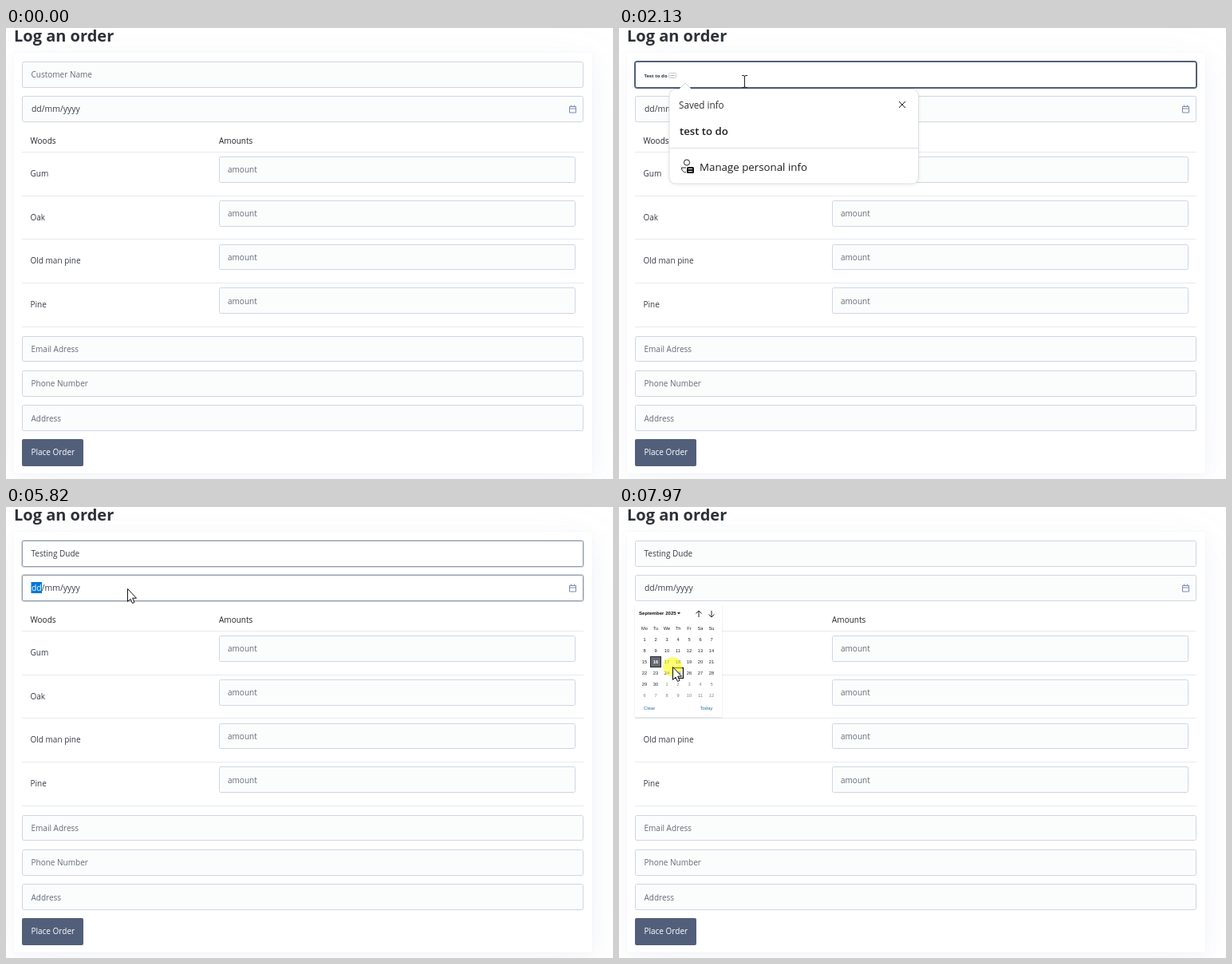
An HTML page that plays this animation: 761 by 565 pixels, repeating every 8 s.

```html
<!DOCTYPE html>
<html lang="en">
<head>
<meta charset="utf-8">
<title>Log an order</title>
<style>
  html, body { margin: 0; width: 100%; height: 100%; overflow: hidden; background: #fff; }
  body { position: relative; }
  .card {
    position: absolute; left: 10px; top: 31px; width: 725px; height: 527px;
    border-radius: 3px; background: #fff;
    box-shadow: 5px 11px 64px rgba(129,145,181,.06), 2px 4px 16px rgba(129,145,181,.06),
      0 0 0 1px rgba(129,145,181,.025);
  }
  svg { position: absolute; left: 0; top: 0; width: 761px; height: 565px; }
  text { font: 10px "Open Sans", "Noto Sans", sans-serif; fill: #373c44; white-space: pre; }
  .title { font-size: 20px; font-weight: 700; fill: #2d3138; }
  .hint { fill: #646b79; }
  .head { font-weight: 500; fill: #23262c; }
  .date { font-size: 10.4px; }
  .saved { font-size: 11.7px; font-weight: 500; fill: #333; }
  .name { font-size: 13.2px; font-weight: 600; fill: #1f1f1f; }
  .info { font-size: 11.7px; fill: #2b2b2b; }
  .manage { font-size: 13.3px; fill: #1f1f1f; }
  .badge { font-size: 9.5px; font-weight: 500; fill: #1f6bb8; }
  .tiny { font-size: 6px; font-weight: 700; fill: #1d3b50; }
  .cal text { font: 5.7px "Liberation Sans", Arial, sans-serif; fill: #222; text-anchor: middle; }
  .cal .month { font-size: 6.1px; font-weight: 700; text-anchor: start; fill: #111; }
  .cal .other { fill: #86827c; }
  .cal .today { fill: #fff; font-weight: 700; }
  .cal .link { fill: #1c7396; font-size: 6px; }
  .line { fill: none; stroke: #222; stroke-width: 1; }
</style>
</head>
<body>
<div class="card"></div>
<svg id="stage" viewBox="0 0 761 565"></svg>
<script>
const LOOP = 8000;
const label = (x, y, s, cls = '') => `<text x="${x}" y="${y}" class="${cls}">${s}</text>`;
const box = (x, y, w, h, attrs) => `<rect x="${x}" y="${y}" width="${w}" height="${h}" ${attrs}/>`;
const rule = (x1, x2, y, color) => `<path d="M${x1} ${y}H${x2}" stroke="${color}"/>`;
const field = (x, y, w, h, hint = '', id = '') =>
  `<g id="${id}">` +
  box(x, y, w, h, 'rx="3" fill="none" stroke="#525f7a" stroke-width="2" opacity="0" class="ring"') +
  box(x + .5, y + .5, w - 1, h - 1, 'rx="2" fill="#fbfdfd" stroke="#cfd5e2" class="edge"') +
  '</g>' + label(x + 11.5, y + 20, hint, 'hint');

function formMarkup() {
  const woods = [['Gum', 161, 33], ['Oak', 216, 33], ['Old man pine', 271, 32], ['Pine', 325, 33]];
  return label(10, 17, 'Log an order', 'title') +
    field(20, 42, 704, 33, '', 'customer') +
    label(31.5, 62, 'Customer Name', 'hint" id="nameHint') +
    field(20, 85, 704, 33, '', 'date') +
    box(31.5, 94, 13.5, 14, 'fill="#0078d7" id="daySelect"') +
    label(32, 105, '<tspan id="day">dd</tspan>/mm/yyyy', 'date') +
    '<path d="M706.5 98.5h8v7.5h-8zM706.5 101h8M708.5 96.5v2M712.5 96.5v2" fill="none" stroke="#7f88b3"/>' +
    label(30.5, 145, 'Woods', 'head') + label(267, 145, 'Amounts', 'head') +
    rule(20, 724, 155.5, '#e7eaf0') +
    woods.map(([wood, y, h], i) =>
      label(30.5, [186, 241, 295, 350][i], wood) +
      field(267, y, 447, h) + label(278, [181, 236, 291, 346][i], 'amount', 'hint') +
      rule(20, 724, [210.5, 264.5, 319.5, 374.5][i], '#e7eaf0')).join('') +
    field(20, 386, 704, 32, 'Email Adress') +
    field(20, 429, 704, 33, 'Phone Number') +
    field(20, 472, 704, 33) + label(31.5, 493, 'Address', 'hint') +
    box(20, 515, 77, 34, 'rx="2" fill="#525f7a"') +
    '<text x="31.5" y="535" style="fill:#fff">Place Order</text>' +
    label(31.5, 62, '', '" id="typed') +
    box(32, 52, 1, 13, 'fill="#111" id="caret"') +
    '<g id="preview">' + label(31.5, 62, 'Test to do', 'tiny') +
    box(62.5, 56.5, 9, 6, 'rx="1" fill="#fff" stroke="#b8bdc4" stroke-width=".8"') +
    rule(64, 70, 59.5, '#b8bdc4') + '</g>';
}

function popupMarkup(id, bottom, entries) {
  const y = bottom - 27;
  return `<g id="${id}" class="popup">` +
    box(63, 76.5, 312.5, bottom - 76.5, 'rx="8" fill="#fff" stroke="#dfe0e3" style="filter:drop-shadow(0 1px 2px rgba(0,0,0,.08))"') +
    '<path d="M75 77L83 69L91 77" fill="#fff" stroke="#d0d3d8"/>' + rule(75.5, 90.5, 77, '#fff') +
    label(75, 101, 'Saved info', 'saved') +
    '<path d="M351 92l8 8M359 92l-8 8" class="line" stroke-width="1.2"/>' +
    entries + rule(63, 375, bottom - 44.5, '#dfe0e3') +
    `<g transform="translate(0 ${y})"><circle cx="85" cy="0.5" r="3.6" class="line" stroke-width="1.2"/>` +
    '<path d="M84 13C80 12.500 78.500 10 78.500 7H84" class="line" stroke-width="1.2"/>' +
    box(85, 6, 9, 8, 'rx="1.5" fill="#111"') + rule(87, 92, 8.5, '#fff') + rule(87, 92, 11.5, '#fff') +
    '</g>' + label(101, bottom - 16, 'Manage personal info', 'manage') + '</g>';
}

function popupsMarkup() {
  const full =
    label(76, 137, 'Oaky Boy', 'name') +
    box(142.5, 120.5, 56, 19.5, 'rx="4" fill="#deecfa" stroke="#8fc3f3"') +
    label(149, 134, 'Last used', 'badge') +
    label(76, 160, '2025-09-08 · 12 · heyheyelmtreedaytrees@elm ·', 'info') +
    label(76, 193, 'Hugo', 'name') +
    label(76, 214, '2 · 2 · 2 · 2 · u@u.zzz · 1212121212 · kjdfskjd', 'info') +
    label(77, 247, 'Level 2 programming assesment - FErny T...', 'name') +
    label(76, 268, 'tobrin@merrow.school.zz', 'info') +
    box(366.5, 114, 4.5, 55, 'rx="2" fill="#8b8b8b"');
  const first = label(76, 134, 'test to do', 'name');
  return popupMarkup('full', 340, full) +
    popupMarkup('two', 231, first + label(76, 170, 'tree', 'name')) +
    popupMarkup('one', 195, first);
}

function calendarMarkup() {
  const column = i => 32 + 14 * (i % 7);
  const weekdays = ['Mo', 'Tu', 'We', 'Th', 'Fr', 'Sa', 'Su'];
  let days = '';
  for (let i = 0; i < 42; i++) {
    const cls = i > 29 ? 'other' : i === 15 ? 'today' : '';
    days += label(column(i), 168 + 14 * Math.floor(i / 7), i % 30 + 1, cls);
  }
  return '<g id="calendar" class="cal">' +
    box(20, 122, 109, 141, 'fill="#fff" style="filter:drop-shadow(0 1px 1px rgba(0,0,0,.12))"') +
    label(25, 135, 'September 2025', 'month') +
    '<path d="M73 132h4l-2 2.500z" fill="#222"/>' +
    '<path d="M100 138v-8M96.500 133.500l3.500-3.500l3.500 3.500M116 130v8M112.500 134.500l3.500 3.500l3.500-3.500" class="line" stroke-width=".8"/>' +
    weekdays.map((d, i) => label(column(i), 154, d)).join('') +
    box(39.5, 187.5, 13, 13, 'fill="#686b73" stroke="#25272c"') +
    box(67.5, 201.5, 13, 13, 'fill="#f1f1f1" stroke="#111" stroke-width="1.2" id="picked"') +
    days + label(38, 254, 'Clear', 'link') + label(109.5, 254, 'Today', 'link') + '</g>';
}

document.getElementById('stage').innerHTML = formMarkup() + popupsMarkup() + calendarMarkup() +
  '<circle id="press" r="12" fill="#ffff00" opacity=".55"/>' +
  '<path id="arrow" d="M.5 .5V16.500L4 13.200L6.500 18.500L9 17.500L6.700 12.200H11.500Z" fill="#fff" stroke="#111"/>' +
  '<path id="beam" d="M-3 -7.500H-1Q.5 -7.500 .5 -6V6Q.5 7.500 -1 7.500H-3M4 -7.500H2Q.5 -7.500 .5 -6M.5 6Q.5 7.500 2 7.500H4" class="line"/>';

const $ = id => document.getElementById(id);
const show = (id, on) => { $(id).style.display = on ? '' : 'none'; };
const between = (t, a, b) => t >= a && t < b;
const latest = (table, t) => table.reduce((found, row) => row[0] <= t ? row[1] : found, table[0][1]);
const ramp = (t, start) => Math.min(1, Math.max(0, (t - start) / 200));

const typing = [[0, ''], [1800, 'T'], [2060, 'Te'], [2480, 'Tes'], [2550, 'Test'], [2620, 'Testi'],
  [2730, 'Testin'], [2800, 'Testing'], [3010, 'Testing '], [3600, 'Testing D'], [3880, 'Testing Di'],
  [4220, 'Testing D'], [4410, 'Testing Du'], [4620, 'Testing Dud'], [4690, 'Testing Dude']];
const popups = [[0, ''], [1000, 'full'], [1800, 'two'], [2130, 'one'], [2620, '']];
const caret = [[0, false], [1000, true], [1550, false], [1800, true], [2130, false], [2200, true],
  [3550, false], [3600, true], [5220, false]];
const presses = [[0, null], [1000, [155, 66]], [1200, null], [5750, [152, 102]], [5820, null],
  [6960, [713, 103]], [7030, null], [7970, [67, 200]]];

// start time, number of steps, way points
const moves = [
  [330, 8, [[0, 504], [60, 300], [130, 110], [157, 66]]],
  [5350, 6, [[157, 70], [152, 102]]],
  [5890, 3, [[152, 108], [158, 125]]],
  [6090, 6, [[200, 124], [480, 104], [749, 85], [725, 97]]],
  [6560, 3, [[722, 98], [713, 103]]],
  [7160, 8, [[640, 110], [300, 150], [1, 190], [100, 210], [171, 214]]],
  [7700, 3, [[140, 210], [67, 200]]]
];
const STEP = 66;

function pointer(t) {
  const move = moves.filter(m => m[0] <= t).pop();
  if (!move) return null;
  const [start, count, path] = move;
  const step = Math.min(count - 1, Math.floor((t - start) / STEP));
  const place = step / (count - 1) * (path.length - 1);
  const i = Math.min(path.length - 2, Math.floor(place));
  return path[i].map((v, axis) => Math.round(v + (path[i + 1][axis] - v) * (place - i)));
}

const overText = ([x, y]) => between(x, 20, 724) &&
  [42, 386, 429, 472].some(top => between(y, top, top + 33));

function focus(id, level) {
  const mix = (a, b) => Math.round(a + (b - a) * level);
  const edge = $(id).querySelector('.edge');
  edge.setAttribute('stroke', `rgb(${mix(207, 82)},${mix(213, 95)},${mix(226, 122)})`);
  edge.setAttribute('fill', level > .3 ? '#fff' : '#fbfdfd');
  $(id).querySelector('.ring').setAttribute('opacity', level * level);
}

function render(t) {
  const text = latest(typing, t);
  const preview = between(t, 2130, 2200);
  $('typed').textContent = text;
  show('typed', !preview);
  show('preview', preview);
  show('nameHint', !text);
  show('caret', latest(caret, t));
  $('caret').setAttribute('x', Math.round(31.5 + (text ? $('typed').getComputedTextLength() : 0)));

  const open = latest(popups, t);
  ['full', 'two', 'one'].forEach(id => show(id, id === open));

  focus('customer', ramp(t, 950) - ramp(t, 5720));
  focus('date', ramp(t, 5720) - ramp(t, 7010));
  const daySelected = between(t, 5750, 7030);
  show('daySelect', daySelected);
  $('day').style.fill = daySelected ? '#fff' : '';
  show('calendar', t >= 7030);
  show('picked', t >= 7830);

  const press = latest(presses, t);
  show('press', press);
  if (press) $('press').setAttribute('transform', `translate(${press})`);

  const at = pointer(t);
  const beam = at && overText(at);
  show('arrow', at && !beam);
  show('beam', beam);
  if (at) $(beam ? 'beam' : 'arrow').setAttribute('transform', `translate(${at[0]} ${at[1] + (beam ? 1 : 0)})`);
}

function tick() {
  render(performance.now() % LOOP);
  requestAnimationFrame(tick);
}
tick();
</script>
</body>
</html>
```
